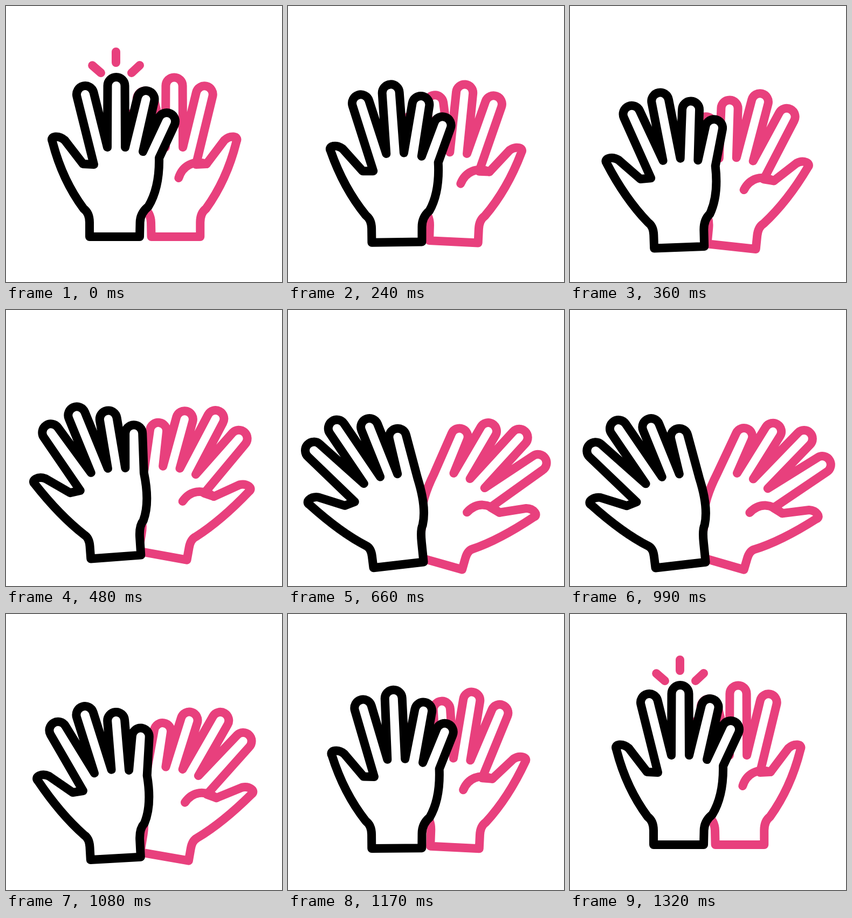
An HTML page for the animation above (1800 ms loop, 512 px wide and 512 px high).

```html
<!DOCTYPE html>
<html lang="en">
<head>
<meta charset="utf-8">
<title>High five</title>
<style>
  html, body { margin: 0; width: 100%; height: 100%; overflow: hidden; background: #fff; }
  svg { display: block; width: 100vw; height: 100vh; }
  path { fill: #fff; stroke-width: 16; stroke-linecap: round; stroke-linejoin: round; }
  .pink { stroke: #e8407d; }
  .black { stroke: #000; }
  .line { fill: none; }
</style>
</head>
<body>
<svg viewBox="0 0 512 512">
  <path id="sparks" class="pink line"/>
  <path id="back" class="pink"/>
  <path id="crease" class="pink line"/>
  <path id="front" class="black"/>
</svg>
<script>
const LOOP = 1800, STEP = 30, DOWN = 900, UP = 1242;
const DROP = 62, RADIUS = 16;

// Key points of one hand: x, y when raised, then x, y when lowered.
const HAND = {
  cuff: [[155, 428, 159, 489], [248, 428, 252, 477]],
  hollow: [[155, 384, 154, 454], [249, 384, 245, 415]],
  heel: [[144, 376, 146, 450], [264, 372, 248, 407]],
  edge: [[104, 322, 97, 429], [285, 337, 254, 374]],
  web: [[143, 293, 101, 376]],
  roots: [[163, 294, 119, 368], [188, 262, 135, 334], [221, 262, 165, 320],
    [254, 270, 197, 313], [284, 282, 235, 320]],
  tips: [[147, 164, 36, 277], [204.5, 148, 77, 233], [259.5, 173, 138, 227], [298, 214, 192, 243]],
  crease: [[168, 285, 124, 361], [189, 297, 147, 361], [196, 319, 163, 383]]
};
// Thumb end, relative to the web.
const THUMB = [[-57, -42], [-62, -52], [-45, -54], [-34, -44]];

const clamp = x => Math.min(1, Math.max(0, x));
const smooth = x => x * x * (3 - 2 * x);
const mix = (a, b, k) => a.map((v, i) => v + (b[i] - v) * k);

function turn([x, y], degrees, size = 1) {
  const a = degrees * Math.PI / 180, c = Math.cos(a) * size, s = Math.sin(a) * size;
  return [x * c - y * s, x * s + y * c];
}

// Cubic bezier easing (.55, 0, .45, 1), solved by bisection.
function steep(x) {
  let lo = 0, hi = 1;
  for (let i = 0; i < 24; i++) {
    const s = (lo + hi) / 2, r = 1 - s;
    if (1.65 * s * r * r + 1.35 * s * s * r + s * s * s < x) lo = s; else hi = s;
  }
  return smooth(lo);
}

const swing = (t, end, ease) => t < DOWN
  ? ease(t / DOWN)
  : 1 - ease(clamp((t - DOWN) / (end - DOWN)));

// Bend reshapes the hand, move lowers it.
function pose(bend, move) {
  const at = ([x, y, x2, y2]) => mix([x, y + DROP * move], [x2, y2 + DROP * (move - 1)], bend);
  const hand = {};
  for (const part in HAND) hand[part] = HAND[part].map(at);
  const [wx, wy] = hand.web[0];
  hand.thumb = THUMB.map(p => turn(p, -39 * bend, 1 - 0.08 * bend))
    .map(([x, y]) => [wx + x, wy + y]);
  return hand;
}

const list = (place, ...pts) => pts.map(p => place(p).map(v => v.toFixed(2))).join(' ');

function outline({ cuff, hollow, heel, edge, web, roots, tips, thumb }, place, sweep) {
  const pts = (...p) => list(place, ...p);
  const wrist = cuff.map((c, i) => mix(c, hollow[i], 0.6));
  let d = `M${pts(cuff[0], wrist[0])}Q${pts(hollow[0], heel[0], edge[0], thumb[0])}`
    + `C${pts(...thumb.slice(1))}L${pts(web[0], roots[0])}`;
  tips.forEach(([x, y], i) => {
    const [bx, by] = mix(roots[i], roots[i + 1], 0.5);
    const k = RADIUS / Math.hypot(bx - x, by - y);
    const nx = (y - by) * k, ny = (bx - x) * k;
    // Radius 1 is scaled up to a half circle between the two ends.
    d += `L${pts([x + nx, y + ny])}A1 1 0 0 ${sweep} ${pts([x - nx, y - ny])}L${pts(roots[i + 1])}`;
  });
  return d + `Q${pts(edge[1], heel[1], hollow[1], wrist[1])}L${pts(cuff[1])}Z`;
}

// The back hand is mirrored and also tilts around its cuff while it slides left.
function backPlace(hand, move) {
  const mirror = ([x, y]) => [511.4 - 0.975 * x, y];
  const [cx, cy] = mirror(hand.cuff[0]);
  return p => {
    const [x, y] = mirror(p), [dx, dy] = turn([x - cx, y - cy], 11 * move);
    return [cx + dx - 41 * move, cy + dy + 4 * move];
  };
}

const setPath = (id, d) => document.getElementById(id).setAttribute('d', d);

function spark(angle, x, y, length, grow) {
  const [dx, dy] = turn([0, -length * grow], angle);
  return `M${x},${y}l${dx},${dy}`;
}

function draw(t) {
  const move = swing(t, UP, smooth);
  const front = pose(swing(t, 1246, steep), move);
  const back = pose(swing(t, 1320, steep), move);
  const place = backPlace(back, move);
  setPath('front', outline(front, p => p, 1));
  setPath('back', outline(back, place, 0));
  setPath('crease', `M${list(place, back.web[0])}C${list(place, ...back.crease)}`);

  const grow = t < DOWN ? 1 - clamp(t / 120) : clamp((t - 1220) / 100);
  setPath('sparks', grow
    ? spark(0, 204, 105, 20, grow) + spark(-48.8, 176, 124, 21, grow) + spark(47, 233, 124, 20.5, grow)
    : '');
}

const start = performance.now();
function tick(now) {
  const t = Math.max(0, now - start) % LOOP;
  draw(Math.floor(t / STEP) * STEP);
  requestAnimationFrame(tick);
}
draw(0);
requestAnimationFrame(tick);
</script>
</body>
</html>
```
